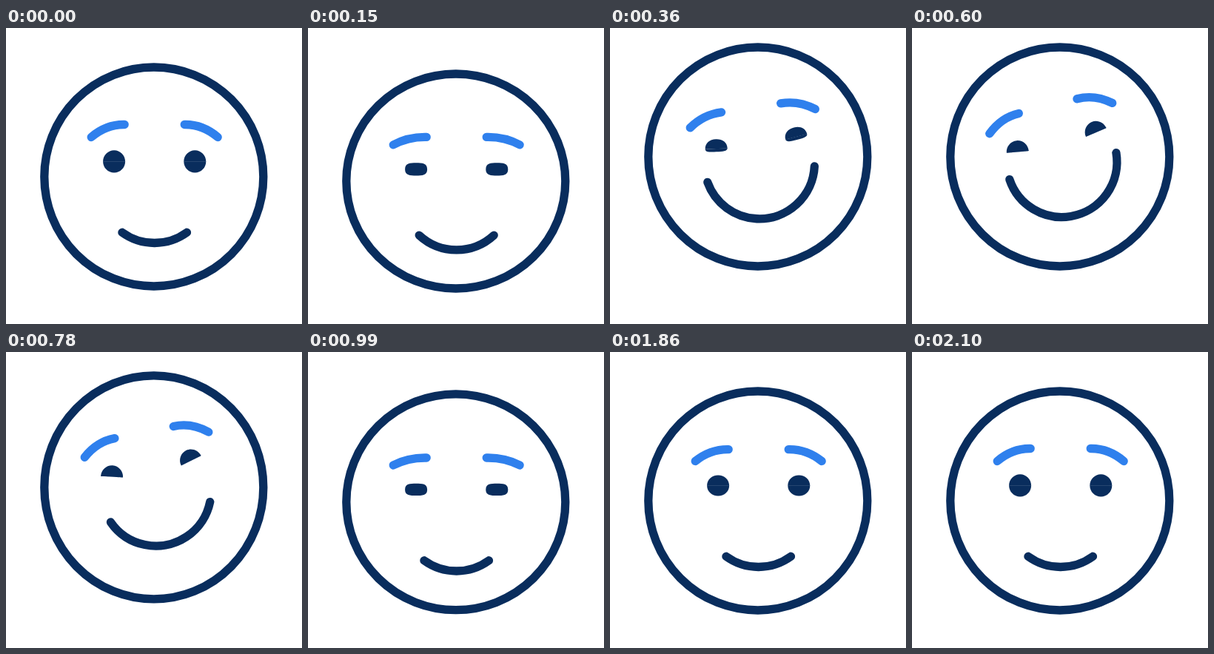
Write an HTML page with a canvas that moves like this. It is 400x400 px and loops after 3150 ms.

```html
<!DOCTYPE html>
<html lang="en">
<head>
<meta charset="utf-8">
<title>Smiling face</title>
<style>
  html, body { margin: 0; width: 100%; height: 100%; overflow: hidden; background: #fff; }
  canvas { display: block; width: 100vmin; height: 100vmin; }
</style>
</head>
<body>
<canvas id="stage" width="400" height="400"></canvas>
<script>
const ctx = document.getElementById('stage').getContext('2d');
const NAVY = '#092d5d', BLUE = '#2f80ed';
const STEP = 30, FRAMES = 105;
const HOME = 201, HOP = 27, DIP = 11;

const rad = deg => deg * Math.PI / 180;

// Eased rise from 0 to 1 between frames a and b.
function ramp(f, a, b) {
  const u = Math.min(1, Math.max(0, (f - a) / (b - a)));
  return u * u * (3 - 2 * u);
}
const hold = (f, a, b, c, d) => ramp(f, a, b) - ramp(f, c, d);
const bump = (f, a, b, c) => hold(f, a, b, b, c);

// Crouch, jump, stay up, land in a crouch and settle.
function height(f) {
  const hop = hold(f, 5, 13, 24.5, 31);
  const dip = bump(f, 0, 4, 11) + bump(f, 27, 31, 35);
  return HOME - HOP * hop + DIP * dip - 1.5 * bump(f, 35, 37.5, 41);
}

// The outline runs slightly ahead of the face, and stretches or squashes.
function outline(f) {
  const lead = 2 * ramp(f, 0, 8) - ramp(f, 12, 20);
  const stretch = 9 * bump(f, 4, 8, 12) + 6 * bump(f, 24, 26, 29);
  const squash = 10 * (bump(f, 0, 4, 7) + bump(f, 28, 30.5, 35));
  return { y: height(f + lead), ry: 148 + (stretch - squash) / 2 };
}

function expression(f) {
  const shut = hold(f, 0, 6, 9, 14) + hold(f, 26, 31, 34, 40) + hold(f, 61, 65, 66, 70);
  const grin = hold(f, 9, 14, 26, 31);
  const lid = 15 - 7 * shut;
  return {
    lidTop: lid,
    lidBottom: lid * (1 - grin),
    slant: grin * (9 + 6 * ramp(f, 20, 26)),
    frown: 7 * shut,
    smile: hold(f, 2, 15, 21, 33),
    tilt: 14 * hold(f, 8, 15, 23.8, 32)
  };
}

function stroke(color, trace) {
  ctx.beginPath();
  trace();
  ctx.strokeStyle = color;
  ctx.stroke();
}

// Half an eye: a half circle of radius 15 flattened to height h.
function eyeHalf(dir, h) {
  const k = 8.28, side = Math.min(k, h) * dir, y = h * dir;
  ctx.moveTo(-15, 0);
  ctx.bezierCurveTo(-15, side, -k, y, 0, y);
  ctx.bezierCurveTo(k, y, 15, side, 15, 0);
}

function drawSide(side, p) {
  ctx.save();
  ctx.scale(side, 1);
  stroke(BLUE, () => {
    ctx.moveTo(85.5, -53.5);
    ctx.quadraticCurveTo(65, -71 + p.frown, 40.5, -70.5 + p.frown);
  });
  ctx.translate(54.6, -20.5);
  ctx.rotate(-rad(p.slant));
  ctx.fillStyle = NAVY;
  ctx.beginPath();
  eyeHalf(-1, p.lidTop + 0.2);
  ctx.rect(-15, -0.2, 30, 0.4);
  ctx.fill();
  ctx.beginPath();
  eyeHalf(1, p.lidBottom);
  ctx.fill();
  ctx.restore();
}

function draw(f) {
  const ring = outline(f), p = expression(f);

  ctx.fillStyle = '#fff';
  ctx.fillRect(0, 0, 400, 400);
  ctx.lineWidth = 11.3;
  ctx.lineCap = 'round';
  stroke(NAVY, () => ctx.ellipse(199.8, ring.y, 148, ring.ry, 0, 0, 2 * Math.PI));

  ctx.save();
  ctx.translate(200.7, height(f));
  ctx.rotate(-rad(p.tilt));
  drawSide(-1, p);
  drawSide(1, p);
  const half = rad(36 + 49.5 * p.smile);
  stroke(NAVY, () => ctx.arc(0, 15 - 7.8 * p.smile, 74.5, Math.PI / 2 - half, Math.PI / 2 + half));
  ctx.restore();
}

const start = performance.now();
function tick() {
  draw(Math.floor((performance.now() - start) / STEP) % FRAMES);
  requestAnimationFrame(tick);
}
tick();
</script>
</body>
</html>
```
